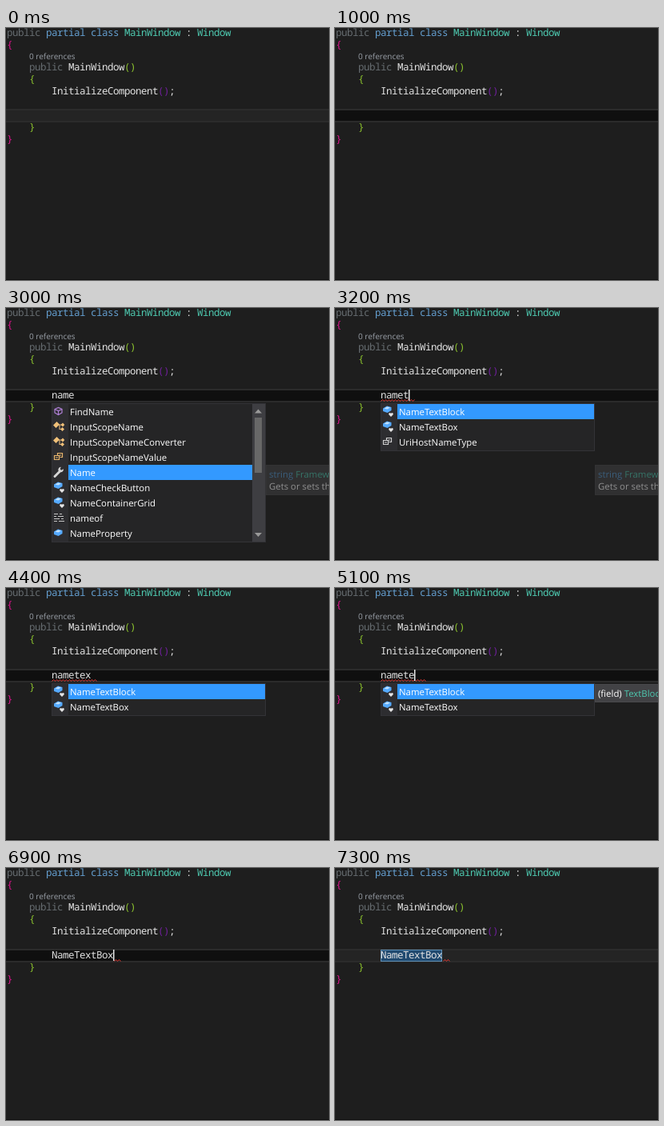
These frames come from a looping animation (404 px wide and 315 px high, 7400 ms). An HTML page:

```html
<!DOCTYPE html>
<html lang="en">
<head>
<meta charset="utf-8">
<title>Code completion</title>
<style>
  html, body { margin: 0; width: 100%; height: 100%; overflow: hidden; background: #1e1e1e; }
  svg { display: block; width: 404px; height: 315px; }
  text { white-space: pre; text-rendering: geometricPrecision; }
  .code { font: 12.5px "Noto Sans Mono", monospace; letter-spacing: -.5px; fill: #e4e4e4; }
  .ui { font: 11.4px "Open Sans", "Noto Sans", sans-serif; fill: #fff; }
  .lens { font: 10px "Open Sans", "Noto Sans", sans-serif; letter-spacing: 0; fill: #9aa0a8; }
  .dim { fill: #666c70; }
  .key { fill: #649fd0; }
  .type { fill: #4ec9b0; }
  .pink { fill: #e0128f; }
  .lime { fill: #8cc32e; }
  .plum { fill: #70209c; }
  .blue { fill: #569cd6; }
</style>
</head>
<body>
<svg viewBox="0 0 404 315">
  <defs>
    <g id="snippet"><rect x="3.5" y="2.5" width="10" height="11" fill="none" stroke="#c0c0c0"/></g>
    <g id="wrench">
      <path d="M3 13.5 9 7.5" stroke="#d4d4d4" stroke-width="3" stroke-linecap="round"/>
      <path d="M13.8 4.2A3.3 3.3 0 1 1 10.8 1.7L9.6 4.2 11.2 5.8Z" fill="#d4d4d4"/>
    </g>
    <g id="brick">
      <path d="M2 6.500 7 3.500 12.500 5V9L7.500 12 2 10Z" fill="#55aaff"/>
      <path d="M3.500 6.500 7.200 4.500 11 5.500 7.300 7.600Z" fill="#c4e2ff"/>
    </g>
    <g id="field">
      <use href="#brick" y="-2"/>
      <path d="M12 15 9.300 12.200Q8.600 10.200 10.500 10 11.500 10 12 11 12.500 10 13.500 10 15.400 10.200 14.700 12.200Z" fill="#e4e4e4"/>
    </g>
    <g id="keyword"><path d="M2 3.500H7M9 3.500H12M2 6.500H5M7 6.500H14M2 9.500H9M11 9.500H14M2 12.500H6M8 12.500H15" stroke="#c8c8c8" stroke-width="1.200"/></g>
    <g id="class">
      <path d="M7 6H12M9 6V11.500H12" fill="none" stroke="#d8b078" stroke-width="1.200"/>
      <path d="M1 6.500 5.500 2 9 5.500 4.500 10ZM10.500 6 13 3.500 15.300 6 13 8.500ZM10 11.500 12.500 9 15 11.500 12.500 14Z" fill="#f0c078"/>
    </g>
    <g id="enum" fill="none" stroke-width="1.200">
      <path d="M6.500 6V3.500H12.500V8.500H9.500M2.500 6.500H8.500V11.500H2.500ZM8.500 6H11M4 9H7"/>
    </g>
    <g id="method"><path d="M3 5.500 7.500 3.500 12 5.500V10L7.500 12.500 3 10ZM3 5.500 7.500 7.500 12 5.500M7.500 7.500V12.500" fill="none" stroke="#b180d7" stroke-width="1.200"/></g>
  </defs>
  <rect width="404" height="315" fill="#1e1e1e"/>
  <rect y="314" width="404" height="1" fill="#111"/>
  <g id="back"></g>
  <g class="code">
    <text x="1" y="10"><tspan class="dim">public</tspan> <tspan class="key">partial class</tspan> <tspan class="type">MainWindow</tspan> : <tspan class="type">Window</tspan></text>
    <text x="1" y="25" class="pink">{</text>
    <text x="29" y="39" class="lens">0 references</text>
    <text x="29" y="53"><tspan class="dim">public</tspan> MainWindow<tspan class="lime">()</tspan></text>
    <text x="29" y="68" class="lime">{</text>
    <text x="57" y="83">InitializeComponent<tspan class="plum">()</tspan>;</text>
    <text x="29" y="128" class="lime">}</text>
    <text x="1" y="143" class="pink">}</text>
  </g>
  <g id="front"></g>
</svg>
<script>
const LOOP = 7400, LEFT = 57, CHAR = 7, ROW = 19;
const back = document.getElementById('back');
const front = document.getElementById('front');

const fields = ['field NameTextBlock', 'field NameTextBox'];
const lists = {
  na: ['snippet mvcpostaction4', 'wrench Name', 'field NameCheckButton', 'field NameContainerGrid',
    'keyword nameof', 'brick NameProperty', 'class NameScope', 'snippet namespace', 'field NameTextBlock'],
  name: ['method FindName', 'class InputScopeName', 'class InputScopeNameConverter', 'enum InputScopeNameValue',
    'wrench Name', 'field NameCheckButton', 'field NameContainerGrid', 'keyword nameof', 'brick NameProperty'],
  namet: [...fields, 'enum UriHostNameType'],
  fields
};
const tips = {
  name: { y: 196, h: 38, lines: ['<tspan class="blue">string</tspan> <tspan class="type">FrameworkElement</tspan>.Name', 'Gets or sets the identifying name'] },
  block: { y: 120, h: 23, lines: ['(field) <tspan class="type">TextBlock</tspan> MainWindow.NameTextBlock'] }
};

// Each step changes part of the editor state; caret is a column, wave a pixel range.
const steps = [
  [0, { band: '#242424', text: '', caret: null, wave: null, list: null, pick: 0, thumb: null, tip: null, fade: 1, marked: false }],
  [500, { band: '#0f0f0f', caret: 0 }],
  [1000, { caret: null }],
  [1500, { caret: 0 }],
  [1800, { text: 'n', caret: 1 }],
  [1900, { list: 'na', pick: 4, thumb: [209, 8] }],
  [2000, { text: 'na', caret: null }],
  [2100, { text: 'nam' }],
  [2200, { text: 'name' }],
  [2300, { list: 'name', thumb: [137, 69] }],
  [3000, { tip: 'name', fade: .5 }],
  [3100, { fade: 1 }],
  [3200, { text: 'namet', caret: 5, wave: [57, 100], list: 'namet', pick: 0, thumb: null, fade: .5 }],
  [3300, { tip: null }],
  [3500, { text: 'namete', caret: 6, wave: [57, 107], list: 'fields' }],
  [3800, { text: 'nametex', caret: null }],
  [3900, { caret: 7 }],
  [4000, { wave: [57, 114] }],
  [4400, { caret: null }],
  [4500, { tip: 'block', fade: .5 }],
  [4600, { fade: 1 }],
  [4900, { caret: 7 }],
  [5100, { text: 'namete', caret: 6 }],
  [5400, { pick: 1, tip: null }],
  [5500, { text: 'NameTextBox', caret: null, list: null }],
  [5600, { caret: 11, wave: [57, 143] }],
  [6200, { wave: [135, 143] }],
  [6400, { caret: null }],
  [6900, { caret: 11 }],
  [7200, { band: null, caret: null, marked: true }],
  [7300, { band: '#242424' }]
];

const rect = (x, y, w, h, fill, extra = '') =>
  `<rect x="${x}" y="${y}" width="${w}" height="${h}" fill="${fill}" ${extra}/>`;
const label = (x, y, text, type = 'ui') => `<text x="${x}" y="${y}" class="${type}">${text}</text>`;

function drawWave([from, to]) {
  let points = '';
  for (let x = from; x <= to; x += 2) points += `${x + .5},${(x - from) % 4 ? 114.5 : 116.5} `;
  return `<polyline points="${points}" fill="none" stroke="#f03a34"/>`;
}

function drawScrollbar([y, h]) {
  return rect(308, 120, 16, 172, '#3e3e42') + rect(311, y, 9, h, '#686868') +
    '<path d="M311 131.5h9l-4.500-5zM311 281h9l-4.500 5z" fill="#999"/>';
}

function drawList({ list, pick, thumb }) {
  const items = lists[list];
  const height = items.length * ROW + 1;
  const rows = items.map((item, i) => {
    const [icon, name] = item.split(' ');
    const top = 120.5 + i * ROW;
    const stroke = list === 'name' ? '#e8b56c' : '#d0d0d0';
    return (i === pick ? rect(78, Math.floor(top), thumb ? 230 : 246, ROW, '#3399ff') : '') +
      `<use href="#${icon}" x="58" y="${top + .5}" stroke="${icon === 'enum' ? stroke : 'none'}"/>` +
      label(80, top + 13.5, name);
  });
  return rect(57.5, 119.5, 267, height + 1, '#252526', 'stroke="#333337"') +
    rect(58, 120, 20, height, '#2d2d30') + rows.join('') + (thumb ? drawScrollbar(thumb) : '');
}

function drawTip({ tip, fade }) {
  const { y, h, lines } = tips[tip];
  return `<g opacity="${fade}">` +
    rect(325.5, y + .5, 300, h - 1, '#424245', 'stroke="#48484b"') +
    lines.map((line, i) => label(329, y + 16 + i * 15, line)).join('') + '</g>';
}

function draw(s) {
  back.innerHTML = s.band ? rect(0, 101, 404, 17, '#2b2b2b') + rect(0, 103, 404, 13, s.band) : '';
  front.innerHTML =
    (s.marked ? rect(57.5, 102.5, 76, 14, '#204a70', 'stroke="#5f8fb4"') : '') +
    label(LEFT, 113, s.text, 'code') +
    (s.wave ? drawWave(s.wave) : '') +
    (s.caret === null ? '' : rect(LEFT + s.caret * CHAR, 102, 1.5, 14, '#e6e6e6')) +
    (s.list ? drawList(s) : '') +
    (s.tip ? drawTip(s) : '');
}

const start = performance.now();
let shown = -1;
function tick() {
  const time = (performance.now() - start) % LOOP;
  const current = steps.filter(([at]) => at <= time);
  if (current.length !== shown) {
    shown = current.length;
    draw(Object.assign({}, ...current.map(([, change]) => change)));
  }
  requestAnimationFrame(tick);
}
tick();
</script>
</body>
</html>
```
